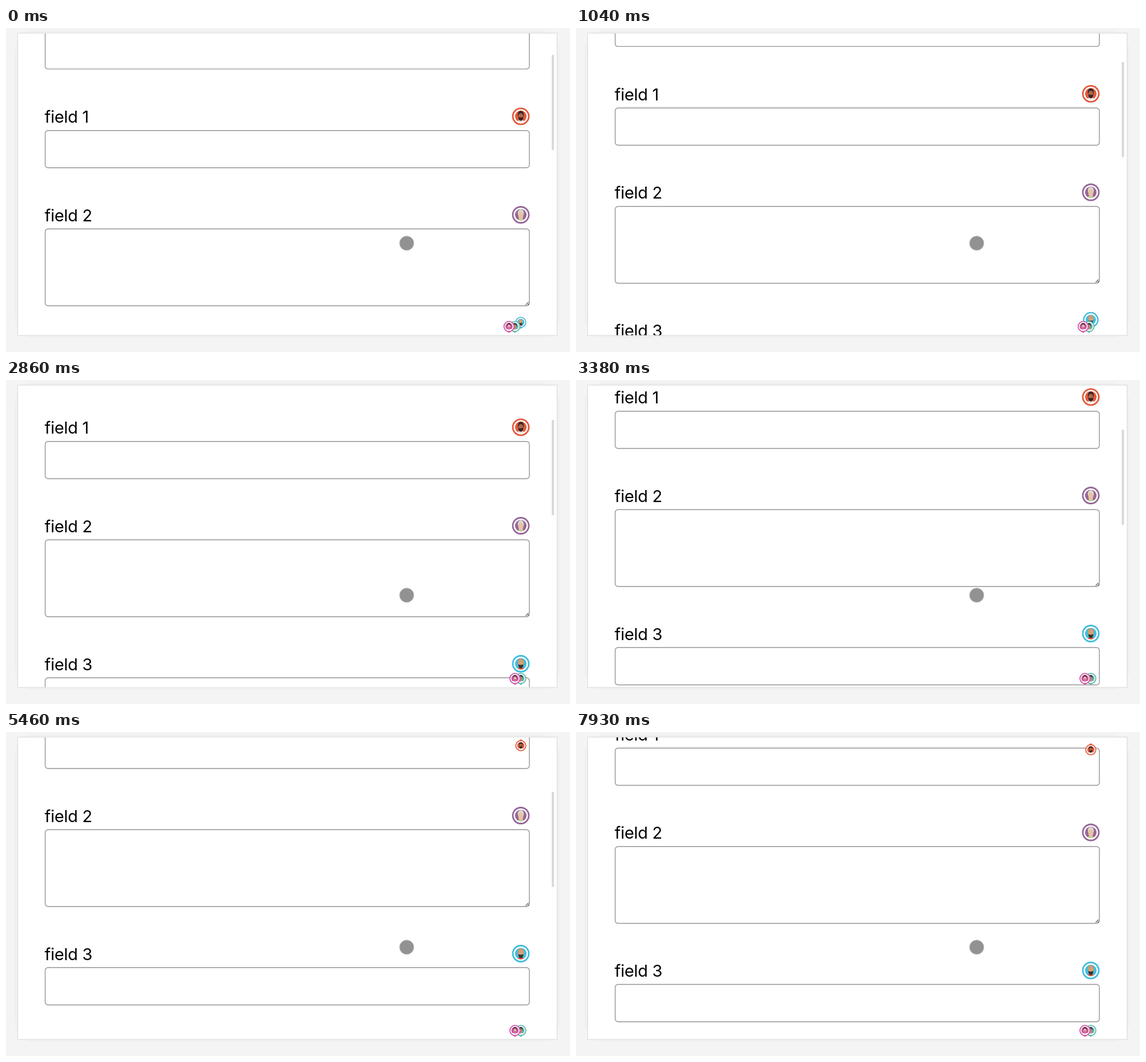
Write an HTML page that moves like this. It is 986 px wide and 568 px high and loops after 8000 ms.

```html
<!DOCTYPE html>
<html lang="en">
<head>
<meta charset="utf-8">
<title>Form with floating avatars</title>
<style>
  html, body { margin: 0; width: 100%; height: 100%; overflow: hidden; background: #f4f4f4; }
  svg { display: block; width: 986px; height: 568px; }
  text { font: 29px Inter, Roboto, sans-serif; letter-spacing: -.3px; }
  .box { fill: #fff; stroke: #949494; stroke-width: 1.4; }
</style>
</head>
<body>
<svg viewBox="0 0 986 568">
  <defs><clipPath id="card"><rect x="21" y="9.5" width="942" height="529"/></clipPath>
  <clipPath id="face"><circle r="10.2"/></clipPath></defs>
  <rect x="15" y="4" width="953" height="540" rx="36" fill="#f0f0f0"/>
  <rect x="20.5" y="9" width="943" height="530" fill="#fff" stroke="#d8d8d8"/>
  <g clip-path="url(#card)">
    <g id="form"></g>
    <g id="people"></g>
    <rect id="bar" x="954" width="4.2" height="167" rx="1.5" fill="#dadada"/>
  </g>
  <circle cx="700.5" cy="377.3" r="12.6" fill="#929292" stroke="#c4c4c4"/>
</svg>
<script>
const LOOP = 8000, STEP = 130, TOP = 9, BOTTOM = 539, PIN = 0.63;
const $ = id => document.getElementById(id);
const clamp = v => Math.max(0, Math.min(1, v));

// Piecewise linear curve through [x, y] points.
function curve(points, x) {
  if (x <= points[0][0]) return points[0][1];
  const i = points.findIndex(p => p[0] >= x);
  if (i < 0) return points[points.length - 1][1];
  const [x0, y0] = points[i - 1], [x1, y1] = points[i];
  return y0 + (y1 - y0) * (x - x0) / (x1 - x0);
}

const scrollCurve = [[0, 0], [520, 21], [910, 36], [1300, 46.5], [1690, 56.5], [1820, 63],
  [1950, 66.5], [2600, 71.7], [2730, 71.7], [2860, 72], [2990, 78], [3250, 107], [3510, 143],
  [3640, 157], [3770, 167], [3900, 174], [4160, 178.5], [4550, 181], [5980, 181],
  [6110, 175], [6240, 166], [6370, 159], [6500, 155.5], [6890, 152.5], [7020, 151.5]];
// Distance from the card edge, by how far the home position lies outside it.
const topCurve = [[-18, 18], [5.5, 22], [13, 25], [28, 15]];
const bottomCurve = [[-26, 26], [9.5, 29], [30.5, 23]];

const field = (y, h, label) =>
  `<rect class="box" x="68.5" y="${y}" width="846.5" height="${h}" rx="5"/>` +
  (label ? `<text x="67.5" y="${y - 13.5}">${label}</text>` : '');
$('form').innerHTML = field(6.4, 65.5) + field(179.8, 65.2, 'field 1') +
  field(352.3, 134.7, 'field 2') + field(594, 65.5, 'field 3') +
  '<path d="M908.5 485.5l5-5M912 485.5l2-2" stroke="#555" stroke-width="1.1"/>';

function avatar(color, skin, hair, shirt, beard) {
  const g = document.createElementNS('http://www.w3.org/2000/svg', 'g');
  g.innerHTML = `<path class="tip" d="M-9 11.5L0 17.8L9 11.5Z" fill="${color}"/>
    <circle r="14" fill="#fff" stroke="${color}" stroke-width="2.8"/>
    <g clip-path="url(#face)"><circle r="10.2" fill="${color}"/>
      <ellipse cy="11" rx="6" ry="5" fill="${shirt}"/>
      <ellipse cy="-3" rx="5.3" ry="6.6" fill="${hair}"/>
      <ellipse cy="0" rx="4.2" ry="5.6" fill="${skin}"/>
      <path d="M-4.4 1Q0 3 4.4 1Q4 8 0 8Q-4 8 -4.4 1Z" fill="${beard}"/></g>`;
  $('people').append(g);
  return g;
}
const orange = avatar('#e4593a', '#a9694a', '#33272a', '#e9e5e2', '#33272a');
const purple = avatar('#966799', '#e8c3a0', '#dcd8d2', '#b9d192', '#e8c3a0');
const blue = avatar('#42bddd', '#d9a06f', '#c79a78', '#d8593d', '#3d302c');
const green = avatar('#58b9ab', '#b98a72', '#2f3435', '#e3e6e2', '#b98a72');
const pink = avatar('#d052a8', '#e9b8a5', '#533443', '#f0dfe8', '#c76a91');

function place(g, x, y, scale, flip) {
  g.setAttribute('transform', `translate(${x} ${y}) scale(${scale})`);
  const tip = g.querySelector('.tip');
  tip.setAttribute('transform', flip ? 'rotate(180)' : '');
  tip.setAttribute('visibility', scale < 0.9 ? 'visible' : 'hidden');
}

// Shows an avatar at home, or as a pin near the edge it has left by.
function float(g, home, atTop) {
  const points = atTop ? topCurve : bottomCurve;
  const out = atTop ? TOP - home : home - BOTTOM;
  const inset = out < points[0][0] ? -out : curve(points, out);
  const grow = clamp((5 - out) / 20);
  place(g, 900, atTop ? TOP + inset : BOTTOM - inset, PIN + (1 - PIN) * grow, atTop);
  return grow;
}

function draw(now) {
  const t = Math.floor(now % LOOP / STEP) * STEP;
  const scroll = curve(scrollCurve, t);
  $('form').setAttribute('transform', `translate(0 ${-scroll})`);
  float(orange, 154.8 - scroll, true);
  place(purple, 900, 327.5 - scroll, 1);
  const shift = 10.4 * (1 - float(blue, 569.5 - scroll, false));
  place(green, 900 - shift, 523.3, PIN);
  place(pink, 889.8 - shift, 523.3, PIN);
  $('bar').setAttribute('y', 47 + scroll * 0.319);
  $('bar').setAttribute('visibility', t < 7020 ? 'visible' : 'hidden');
}

const start = performance.now();
function tick() {
  draw(performance.now() - start);
  requestAnimationFrame(tick);
}
tick();
</script>
</body>
</html>
```
